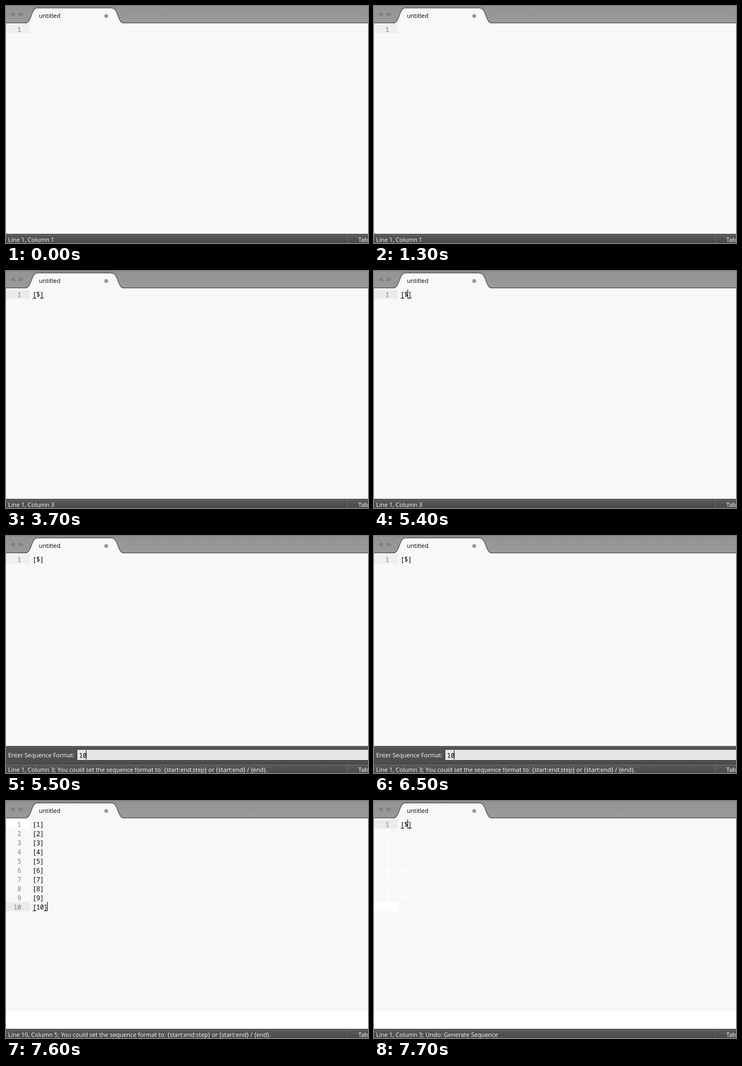
Animation of 670 by 439 pixels, one loop 8 s. Source, as an HTML page with a canvas:

```html
<!DOCTYPE html>
<html lang="en">
<head>
<meta charset="utf-8">
<title>Sequence generator</title>
<style>
html, body { margin: 0; width: 670px; height: 439px; overflow: hidden; background: #f8f8f8; }
canvas { display: block; }
</style>
</head>
<body>
<canvas id="stage" width="670" height="439"></canvas>
<script>
const ctx = document.getElementById('stage').getContext('2d', { alpha: false });
const W = 670, H = 439, LOOP = 8000, TICK = 100;
const CELL = 7, ROW = 17, LEFT = 49, TOP = 34;
const UI = '11px "Open Sans", "Noto Sans", sans-serif';
const MONO = '500 12px "Noto Sans Mono", "DejaVu Sans Mono", monospace';
const BOLD = MONO.replace('500', 'bold');
const HINT = '; You could set the sequence format to: {start:end:step} or {start:end} / {end}.';
const results = Array.from({ length: 10 }, (_, i) => `[${i + 1}]`);

// Editor states; the caret blink restarts with each one
const states = [
  { at: -500, lines: [''], col: 0, status: 'Line 1, Column 1' },
  { at: 1600, lines: ['[]'], col: 1, status: 'Line 1, Column 2' },
  { at: 3200, lines: ['[$]'], col: 2, status: 'Line 1, Column 3' },
  { at: 5500, lines: ['[$]'], panel: true, status: 'Line 1, Column 3' + HINT },
  { at: 6600, lines: results, col: 4, cleared: true, status: 'Line 10, Column 5' + HINT },
  { at: 7700, lines: ['[$]'], col: 2, cleared: true, ghosts: true,
    status: 'Line 1, Column 3; Undo: Generate Sequence' }
];

// Smooth one-second blink, clipped so it rests fully on and fully off
function blink(age) {
  const wave = Math.cos((age - 150) / 1000 * 2 * Math.PI);
  return Math.min(1, Math.max(0, 0.5 + 0.85 * wave));
}

function rect(x, y, w, h, color) {
  ctx.fillStyle = color;
  ctx.fillRect(x, y, w, h);
}

function text(str, x, y, color, font = UI, align = 'left') {
  ctx.font = font;
  ctx.textAlign = align;
  ctx.fillStyle = color;
  ctx.fillText(str, x, y);
}

// Monospaced text on the character grid
function code(str, x, y, color, font = MONO) {
  [...str].forEach((ch, i) => text(ch, x + (i + 0.5) * CELL, y, color, font, 'center'));
}

function lineNumber(n, y, color, font) {
  const str = String(n);
  code(str, 28 - str.length * CELL, y, color, font);
}

function shade(y, h, from, to) {
  const g = ctx.createLinearGradient(0, y, 0, y + h);
  g.addColorStop(0, from);
  g.addColorStop(1, to);
  rect(0, y, W, h, g);
}

function triangle(x, dir) {
  ctx.fillStyle = '#7f7f7f';
  ctx.beginPath();
  ctx.moveTo(x, 15.5);
  ctx.lineTo(x + 9 * dir, 11);
  ctx.lineTo(x + 9 * dir, 20);
  ctx.fill();
}

function drawTabs() {
  shade(0, 31, '#939393', '#9a9a9a');
  rect(0, 0, W, 1, '#8a8a8a');
  rect(0, 30, W, 1, '#858585');
  rect(0, 31, W, 1, '#505050');
  triangle(7, 1);
  triangle(33, -1);
  ctx.beginPath();
  ctx.moveTo(36, 31.5);
  ctx.bezierCurveTo(48, 31, 46, 3.5, 58, 3.5);
  ctx.lineTo(195, 3.5);
  ctx.bezierCurveTo(208, 3.5, 206, 31, 218, 31.5);
  ctx.fillStyle = '#f8f8f8';
  ctx.fill();
  ctx.strokeStyle = '#505050';
  ctx.lineWidth = 1.3;
  ctx.stroke();
  rect(39, 31, 176, 2, '#f8f8f8');
  text('untitled', 61, 22, '#000');
  ctx.fillStyle = '#999';
  ctx.beginPath();
  ctx.arc(185.5, 18.5, 3.6, 0, 7);
  ctx.fill();
}

function caret(x, y, alpha) {
  rect(x, y, 1, ROW, `rgba(0,0,0,${alpha})`);
}

function drawGhosts() {
  rect(0, TOP + 9 * ROW, 44, ROW, '#fff');
  results.forEach((line, i) => {
    const base = TOP + i * ROW + 14;
    lineNumber(i + 1, base, '#fff', BOLD);
    code(line, LEFT, base, '#fff', BOLD);
  });
}

function drawCode(s, alpha) {
  const last = s.lines.length - 1;
  const y = TOP + last * ROW;
  const line = s.lines[last];
  const focused = line && !s.panel;
  if (s.ghosts) {
    drawGhosts();
    rect(44, TOP, 40, ROW, '#f8f8f8');
  }
  if (last) rect(0, TOP, 44, ROW, '#fff');
  rect(0, y, 44, ROW, focused ? '#ebebeb' : '#efefef');
  s.lines.forEach((str, i) => {
    const base = TOP + i * ROW + 14;
    lineNumber(i + 1, base, last ? '#7d7d7d' : '#8c7967');
    code(str, LEFT, base, '#000');
  });
  if (focused) {
    for (const i of [0, line.length - 1]) rect(LEFT + i * CELL, y + 16, CELL, 1, '#333');
  }
  if (!s.panel) caret(LEFT - 1 + s.col * CELL, y, alpha);
}

function drawPanel(alpha) {
  shade(389, 33, '#555', '#4c4c4c');
  rect(0, 389, W, 1, '#383838');
  rect(0, 390, W, 1, '#686868');
  text('Enter Sequence Format:', 4, 410, '#fff');
  rect(131, 395, W - 131, 21, '#3b3b3b');
  rect(132, 396, W - 132, 19, '#e8e6e8');
  code('10', 135, 411, '#000');
  caret(148, 397, alpha);
}

function drawStatus(str) {
  shade(422, 17, '#5c5c5c', '#494949');
  rect(0, 422, W, 1, '#363636');
  rect(0, 423, W, 1, '#707070');
  rect(631, 424, 1, 15, '#737373');
  text(str, 4, 437, '#fff');
  text('Tab', 652, 437, '#fff');
}

function draw(t) {
  const s = states.findLast(e => e.at <= t);
  const alpha = blink(Math.floor(t / TICK) * TICK - s.at);
  rect(0, 0, W, H, '#f8f8f8');
  if (s.cleared) rect(0, 389, W, 33, '#fff');
  drawTabs();
  drawCode(s, alpha);
  if (s.panel) drawPanel(alpha);
  drawStatus(s.status);
}

const start = performance.now();
function frame() {
  draw((performance.now() - start) % LOOP);
  requestAnimationFrame(frame);
}
frame();
</script>
</body>
</html>
```
